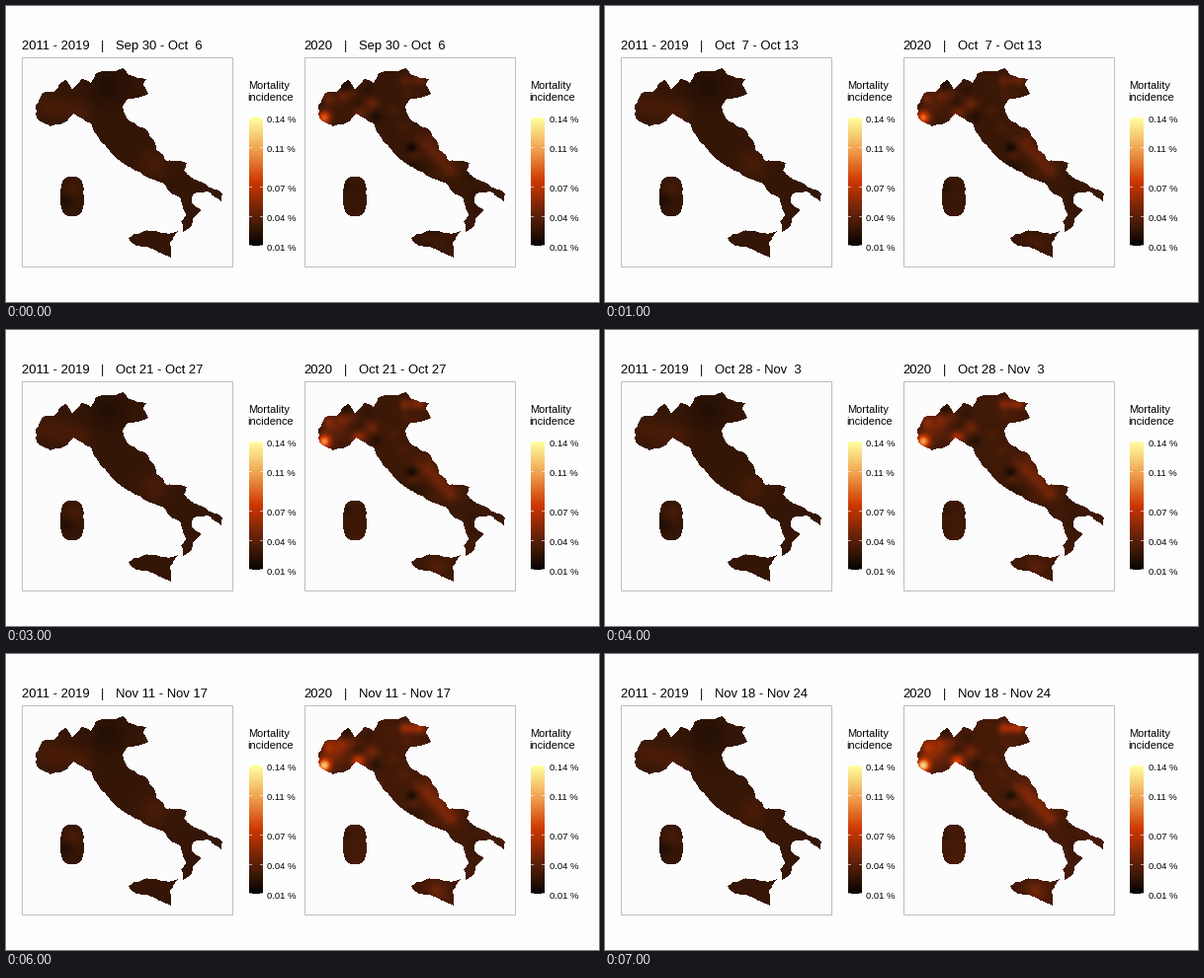
A matplotlib script that plays this animation: 600x300 px, repeating every 8000 ms.

```python
import numpy as np
import matplotlib
import matplotlib.pyplot as plt
from matplotlib.animation import FuncAnimation
from matplotlib.colors import LinearSegmentedColormap
from matplotlib.patches import Rectangle
from matplotlib.path import Path

W, H, DPI = 600, 300, 100
WEEKS, STEP = 8, 1000
X0, X1, Y0, Y1 = 16, 230, 52, 265     # left map panel
PX = 72 / DPI                         # one pixel in points

matplotlib.rcParams["font.family"] = "Liberation Sans"

HEAT = LinearSegmentedColormap.from_list("heat", [
    (0, "#060303"), (0.125, "#341606"), (0.25, "#63220a"), (0.5, "#cd3700"),
    (0.75, "#f0a04e"), (1, "#ffffa0")], N=512)

# Key points of the coast and border, clockwise from the west
MAINLAND = [(45, 122), (31, 113), (30, 101), (37, 88), (50, 86), (60, 75),
            (67, 85), (76, 74), (86, 78), (91, 68), (119, 63), (124, 70),
            (142, 74), (139, 80), (144, 89), (123, 94), (118, 102),
            (124, 116), (143, 126), (152, 146), (163, 157), (183, 159),
            (180, 167), (219, 190), (218, 198), (204, 188), (190, 190),
            (188, 199), (198, 207), (190, 214), (188, 222), (179, 229),
            (177, 218), (182, 212), (176, 194), (168, 191), (160, 180),
            (140, 172), (118, 159), (97, 139), (89, 128), (86, 119),
            (68, 109), (55, 120)]
SICILY = [(123, 235), (138, 229), (174, 228), (166, 240), (167, 255),
          (150, 247), (126, 239)]

xs, ys = np.meshgrid(np.arange(X0, X1) + 0.5, np.arange(Y0, Y1) + 0.5)


def rounded_box(cx, cy, rx, ry, power, count=24):
    a = np.linspace(0, 2 * np.pi, count, endpoint=False)
    c, s = np.cos(a), np.sin(a)
    return np.column_stack([cx + rx * np.sign(c) * abs(c) ** (2 / power),
                            cy + ry * np.sign(s) * abs(s) ** (2 / power)])


def rough_side(a, b, rng):
    """Split a side at a shaken midpoint until its pieces are short."""
    side = b - a
    if np.hypot(*side) < 4:
        return [a]
    normal = np.array([-side[1], side[0]])
    mid = (a + b) / 2 + normal * np.clip(rng.normal(0, 0.07), -0.1, 0.1)
    return rough_side(a, mid, rng) + rough_side(mid, b, rng)


def land_mask():
    rng = np.random.default_rng(4)
    cells = np.column_stack([xs.ravel(), ys.ravel()])
    mask = np.zeros(len(cells), bool)
    for shape in (MAINLAND, SICILY, rounded_box(67, 193, 12, 20.5, 2.8)):
        pts = np.array(shape, float)
        coast = []
        for a, b in zip(pts, np.roll(pts, -1, axis=0)):
            coast += rough_side(a, b, rng)
        mask |= Path(coast).contains_points(cells)
    return mask.reshape(xs.shape)


def bump(x, y, r):
    return np.exp(-((xs - x) ** 2 + (ys - y) ** 2) / (2 * r * r))


def ridge(ax_, ay, bx, by, r):
    """Soft band along the line from a to b."""
    dx, dy = bx - ax_, by - ay
    t = np.clip(((xs - ax_) * dx + (ys - ay) * dy) / (dx * dx + dy * dy), 0, 1)
    return bump(ax_ + t * dx, ay + t * dy, r)


def mottle(seed, count=230, r=4.2, amount=0.05):
    """Random soft patches, calmer towards the south."""
    rng = np.random.default_rng(seed)
    field = np.zeros(xs.shape)
    for x, y, a in zip(rng.uniform(X0, X1, count), rng.uniform(Y0, Y1, count),
                       rng.normal(0, amount, count)):
        field += a * bump(x, y, r)
    return field * np.clip((205 - ys) / 50, 0.3, 1)


def mean_field(u):
    west = 0.05 * ridge(42, 101, 74, 108, 9)
    south = 0.05 * bump(150, 159, 10)
    north = -0.045 * bump(103, 82, 14)
    island = 0.05 * bump(68, 186, 6) - 0.05 * bump(60, 197, 6)
    return 0.125 + 0.006 * u + west + south + north + island


def year_field(u):
    field = 0.135 + 0.035 * u + GRAIN
    field += (0.45 + 0.25 * u) * bump(36, 113, 4.5)       # western corner
    field += (0.04 + 0.16 * u) * bump(46, 97, 10)
    field += (0.08 + 0.26 * u) * bump(70, 109, 4.5)       # gulf coast
    field += (0.10 + 0.16 * u) * ridge(118, 75, 132, 75, 4)
    field += (0.10 + 0.05 * u) * ridge(134, 135, 164, 166, 5.5)
    field += (0.02 + 0.10 * u) * bump(149, 240, 7)
    return field


LAND = land_mask()
GRAIN = mottle(7)


def paint(field, week):
    rgba = HEAT(np.clip(field(week / (WEEKS - 1)), 0.03, 1))
    rgba[..., 3] = LAND
    return rgba


def day_name(n):
    """Date of day n, counted from 1 September."""
    for name, length in (("Sep", 30), ("Oct", 31), ("Nov", 30)):
        if n <= length:
            return f"{name} {n:2d}"
        n -= length


def week_label(week):
    first = 30 + 7 * week
    return f"{day_name(first)} - {day_name(first + 6)}"


fig = plt.figure(figsize=(W / DPI, H / DPI), dpi=DPI, facecolor="#fdfdfd")
ax = fig.add_axes([0, 0, 1, 1])
ax.axis("off")


def write(x, y, text, size):
    return ax.text(x, y, text, fontsize=size * PX, color="black",
                   ha="left", va="baseline")


def picture(data, extent):
    return ax.imshow(data, extent=extent, aspect="auto",
                     interpolation="nearest", zorder=2)


def legend(dx):
    write(dx + 244.7, 84, "Mortality", 11)
    write(dx + 244.7, 96, "incidence", 11)
    ramp = HEAT(np.linspace(1, 0, 130))[:, None, :]
    picture(ramp, (dx + 246, dx + 260, 243, 113))
    for v in (14, 11, 7, 4, 1):
        y = 253 - 10 * v
        write(dx + 264.5, y + 5, f"{v / 100:.2f} %", 9.5)
        tick = min(y, 242) + 0.5
        for x in (246, 257):
            ax.plot([dx + x, dx + x + 3], [tick, tick], color="white",
                    lw=0.6 * PX, solid_capstyle="butt", snap=False, zorder=3)


def panel(dx, years, bar_x, field):
    ax.add_patch(Rectangle((dx + X0 + 0.5, Y0 + 0.5), X1 - X0 - 1, Y1 - Y0 - 1,
                           fc="#fcfcfc", ec="#bebebe", lw=PX, snap=False,
                           zorder=1))
    land = picture(paint(field, 0), (dx + X0, dx + X1, Y1, Y0))
    write(dx + 15.5, 44, years, 13)
    write(bar_x, 44, "|", 13)
    date = write(bar_x + 15.3, 44, week_label(0), 13)
    return land, date, field


panels = [panel(0, "2011 - 2019", 96, mean_field),
          panel(286, "2020", 342, year_field)]
legend(0)
legend(285)
ax.set_xlim(0, W)
ax.set_ylim(H, 0)


def update(week):
    for land, date, field in panels:
        land.set_data(paint(field, week))
        date.set_text(week_label(week))
    return [artist for p in panels for artist in p[:2]]


anim = FuncAnimation(fig, update, frames=WEEKS, interval=STEP, repeat=True,
                     repeat_delay=0, blit=False)
plt.show()
```
